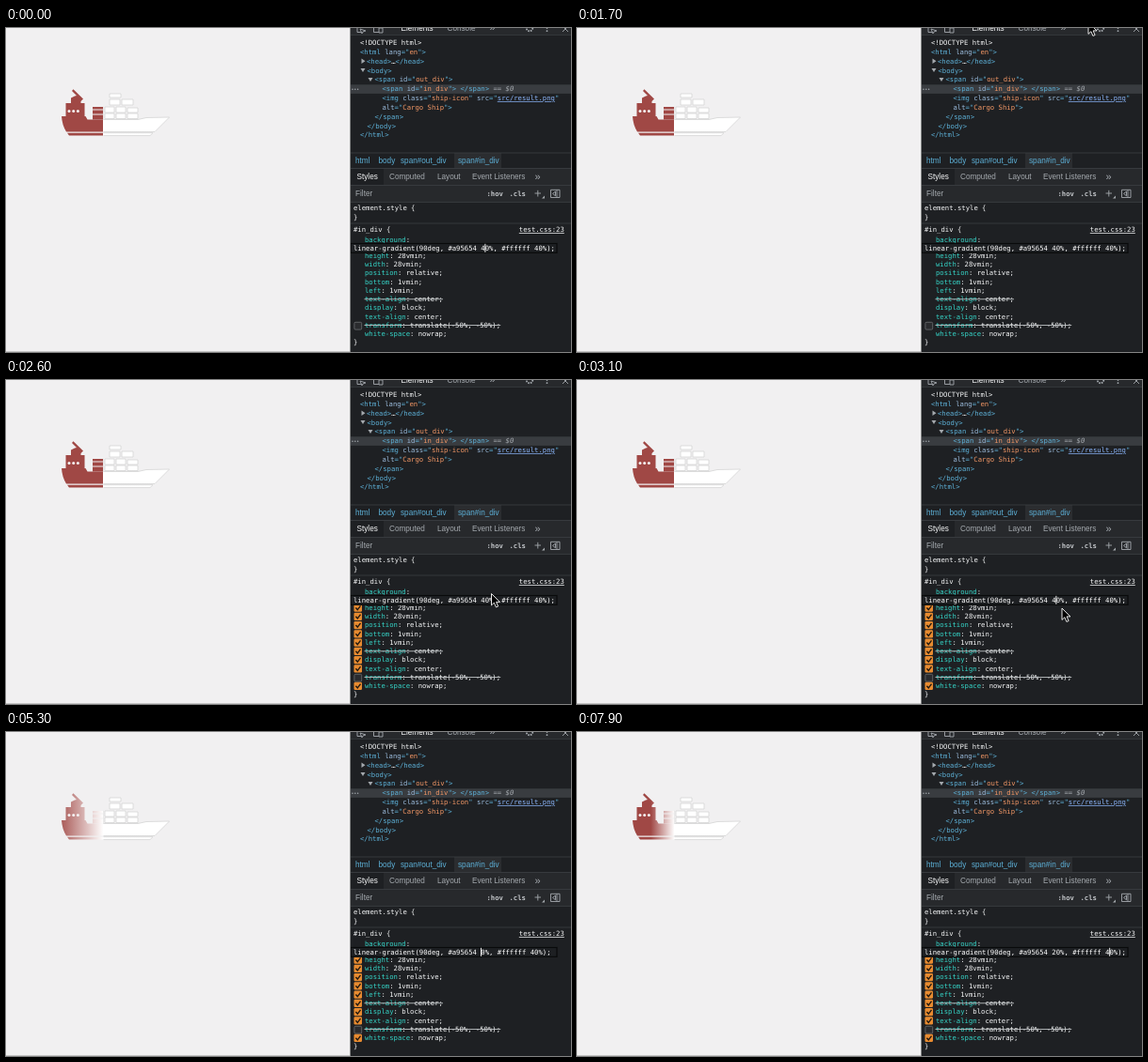
These frames come from a looping animation (600 px wide and 345 px high, 8 s). An HTML page:

```html
<!DOCTYPE html>
<html lang="en">
<head>
<meta charset="utf-8">
<title>Gradient editing</title>
<style>
  html, body { margin: 0; width: 100%; height: 100%; overflow: hidden; background: #f1f0f1; }
  svg { display: block; width: 600px; height: 345px; }
  text { white-space: pre; }
  .mono { font: 7.26px "DejaVu Sans Mono", "Liberation Mono", monospace; }
  .sans { font: 8.2px "Liberation Sans", Arial, sans-serif; }
</style>
</head>
<body>
<svg id="stage" viewBox="0 0 600 345">
  <defs>
    <linearGradient id="paint" gradientUnits="userSpaceOnUse" x1="53.5" x2="178.5" y1="0" y2="0">
      <stop id="stop" offset=".4" stop-color="#a04845"/>
      <stop offset=".4" stop-color="#fff"/>
    </linearGradient>
    <linearGradient id="edge" gradientUnits="userSpaceOnUse" x1="103" x2="104" y1="0" y2="0">
      <stop stop-color="#d4d4d4" stop-opacity="0"/>
      <stop offset="1" stop-color="#d4d4d4"/>
    </linearGradient>
    <pattern id="checks" width="14" height="14" patternUnits="userSpaceOnUse">
      <path fill="#fff" d="M0 0h14v14H0z"/>
      <path fill="#bfbfbf" d="M0 0h7v7H0zM7 7h7v7H7z"/>
    </pattern>
    <g id="ship">
      <path d="M59 94H84.5L86.5 97.5H140L149 95.5 173.5 95 158 110.5H64Q59.5 103 59 94Z"/>
      <path d="M65 111.7H156L153 114.6H67Z"/>
      <path d="M63.5 94V80H69V74.5L73 72.5 75 72 70 67 71.5 65.2 82 75.5 79.5 78V80H83.5V94Z"/>
      <path d="M92 84H103.5V86.5H92ZM92 87.5H103.5V91.5H92ZM92 92.5H103.5V97.5H92Z"/>
      <path d="M105 84H115V90H105ZM105 91H115V96.5H105ZM117 84H127V90H117ZM117 91H127V96.5H117ZM129 85H140V90H129ZM129 91H140V96.5H129Z"/>
      <path d="M110 70H122V74H110ZM110 76H121V82H110ZM123 76H135V82H123Z"/>
    </g>
  </defs>

  <g fill="url(#paint)" stroke="url(#edge)" stroke-width=".8"><use href="#ship"/></g>
  <g fill="#f4f1f1"><circle cx="67" cy="88.5" r="1.5"/><circle cx="71.7" cy="88.5" r="1.5"/><circle cx="76.4" cy="88.5" r="1.5"/></g>
  <path d="M0 344.5H365" stroke="#c4c4c4"/>
  <g id="panel"></g>

  <g id="preview">
    <path d="M374 84H546L553 78 560 84H595Q598 84 598 87V248Q598 251 595 251H374Q371 251 371 248V87Q371 84 374 84Z" fill="#1b1c1f" stroke="#101113"/>
    <path d="M452 96h66v66h-66z" fill="#f1eff0"/>
    <use href="#ship" transform="translate(430.5 82.6) scale(.47)" fill="url(#checks)"/>
    <g id="facts"></g>
  </g>
  <g id="hint">
    <path d="M369.5 245.5H600V269H369.5z" fill="#2a2a2b" stroke="#38383a" stroke-width=".5"/>
    <text class="sans" x="373" y="255" fill="#b9b9b9">Increment/decrement with mousewheel or up/down keys.</text>
    <text class="sans" x="373" y="264.3" fill="#b9b9b9">Cmd: ±100, Shift: ±10, Alt: ±0.1</text>
  </g>
  <path id="arrow" d="M0 0V12.4L2.9 9.7 4.9 14.4 7.1 13.5 5.1 8.9H9Z" fill="#000" stroke="#fff" stroke-width=".9"/>
  <g id="beam" fill="none">
    <path d="M-3 -5Q0 -5 0 -3V4Q0 6 -3 6M3 -5Q0 -5 0 -3V4Q0 6 3 6M-1.5 2H1.5" stroke="#fff" stroke-width="2"/>
    <path d="M-3 -5Q0 -5 0 -3V4Q0 6 -3 6M3 -5Q0 -5 0 -3V4Q0 6 3 6M-1.5 2H1.5" stroke="#000" stroke-width=".8"/>
  </g>
</svg>
<script>
const $ = id => document.getElementById(id);
const WHITE = '#f6f7f8', GREY = '#a4a9ae', TAG = '#5db0d7', ATTR = '#9bbbdc', VALUE = '#f29766', LINK = '#8ab4f8', PROP = '#35d4c7';
const PANEL = '#1e2023', BAR = '#27292c', RULE = '#3c3f43';
const CHAR = 4.37, EDIT_X = 369;

const esc = s => s.replace(/&/g, '&amp;').replace(/</g, '&lt;');
const span = (fill, s, extra = '') => `<tspan fill="${fill}" ${extra}>${esc(s)}</tspan>`;
const text = (cls, x, y, body, extra = '') => `<text class="${cls}" x="${x}" y="${y}" ${extra}>${body}</text>`;
const mono = (x, y, s, fill = WHITE, extra = '') => text('mono', x, y, esc(s), `fill="${fill}" ${extra}`);
const sans = (x, y, s, fill = WHITE, extra = '') => text('sans', x, y, esc(s), `fill="${fill}" ${extra}`);
const rect = (x, y, w, h, fill, extra = '') => `<rect x="${x}" y="${y}" width="${w}" height="${h}" fill="${fill}" ${extra}/>`;
const line = (d, stroke, width = 1) => `<path d="${d}" fill="none" stroke="${stroke}" stroke-width="${width}"/>`;
const dots = (points, r) => points.map(([x, y]) => `<circle cx="${x}" cy="${y}" r="${r}" fill="${GREY}"/>`).join('');
const attr = (name, value) => span(ATTR, ` ${name}`) + span(TAG, '="') + span(VALUE, value) + span(TAG, '"');

function treeMarkup() {
  const rows = [
    [376, span(WHITE, '<!DOCTYPE html>')],
    [376, span(TAG, '<html') + attr('lang', 'en') + span(TAG, '>')],
    [383, span(TAG, '<head>') + span(WHITE, '…') + span(TAG, '</head>')],
    [383.5, span(TAG, '<body>')],
    [391.5, span(TAG, '<span') + attr('id', 'out_div') + span(TAG, '>')],
    [399.5, span(TAG, '<span') + attr('id', 'in_div') + span(TAG, '> </span>') + span(GREY, ' == ') + span(GREY, '$0', 'font-style="italic"')],
    [399.5, span(TAG, '<img') + attr('class', 'ship-icon') + span(ATTR, ' src') + span(TAG, '="') +
      span(LINK, 'src/result.png', 'text-decoration="underline"') + span(TAG, '"')],
    [399.5, span(ATTR, 'alt') + span(TAG, '="') + span(VALUE, 'Cargo Ship') + span(TAG, '">')],
    [391.5, span(TAG, '</span>')],
    [383.5, span(TAG, '</body>')],
    [376, span(TAG, '</html>')]
  ];
  return rect(366, 60.3, 234, 9.6, '#393c40') +
    rows.map(([x, body], i) => text('mono', x, 18 + 9.84 * i, body)).join('') +
    `<path fill="${GREY}" d="M377.5 32.5V38L381.5 35.2ZM376.5 43H381.5L379 47ZM384.5 53H389.5L387 57Z"/>` +
    dots([[368, 65.3], [370.8, 65.3], [373.6, 65.3]], .75);
}

function barsMarkup() {
  const icons =
    'M373 0V4.5H377M376 1L382 3 379 4 378 6ZM390.5 0V4.5H396M396 0H400V5H396Z' +
    'M561.5 176H568M564.8 172.8V179.5M578.5 172.3H588V180.5H578.5ZM585 172.3V180.5M583.5 174L580.5 176.4 583.5 178.8Z' +
    'M591 -2L597 4M597 -2L591 4';
  const big = 'style="font-size:11px"', bold = 'style="font-weight:bold"';
  return rect(366, 0, 234, 7, BAR) + line('M366 7.5H600', RULE, .7) +
    sans(419.5, 3, 'Elements') + sans(468.5, 3, 'Console', GREY) + sans(513.5, 3, '»', GREY, big) +
    `<circle cx="556" cy="0" r="3.3" fill="none" stroke="${GREY}" stroke-width="1.8" stroke-dasharray="1.6 1"/>` +
    dots([[574.5, 0], [574.5, 3.2]], .9) +
    rect(366, 133, 234, 16, PANEL) + rect(476, 133, 50, 16, '#2b2d30') +
    ['html', 'body', 'span#out_div', 'span#in_div'].map((s, i) => sans([371, 395.5, 419, 480][i], 144, s, TAG)).join('') +
    rect(366, 149, 234, 36, BAR) + rect(366, 150, 35, 17, PANEL) +
    line('M366 133H600M366 149.5H600M366 167.5H600M366 185.5H600', RULE, .8) +
    sans(372.5, 161, 'Styles') +
    ['Computed', 'Layout', 'Event Listeners'].map((s, i) => sans([407, 458, 495][i], 161, s, GREY)).join('') +
    sans(561.5, 161.5, '»', GREY, big) + sans(371, 179, 'Filter', GREY) +
    mono(510.5, 178.6, ':hov', '#c3c6ca', bold) + mono(534.5, 178.6, '.cls', '#c3c6ca', bold) +
    line(icons, GREY, .9) + `<path d="M569 181.5H572V178.5Z" fill="${GREY}"/>`;
}

function rulesMarkup() {
  const rules = ['height: 28vmin', 'width: 28vmin', 'position: relative', 'bottom: 1vmin', 'left: 1vmin',
    'text-align: center', 'display: block', 'text-align: center', 'transform: translate(-50%, -50%)', 'white-space: nowrap'];
  const rowY = i => 244.9 + 9.25 * i;
  let ticks = '';
  const body = rules.map((rule, i) => {
    const [name, value] = rule.split(': '), y = rowY(i), off = i === 8;
    if (!off) ticks += rect(369.5, y - 6.4, 8.5, 8.3, '#e88b30', 'rx="1.2"') + line(`M371.4 ${y - 2.3}l1.9 2 3.2 -4.2`, '#241a10', 1.4);
    const strike = off || i === 5 ? line(`M380.5 ${y - 2.4}H${381 + (rule.length + 1) * CHAR}`, '#d0d3d6', .8) : '';
    return text('mono', 381, y, span(PROP, name) + span(WHITE, `: ${value};`)) + strike;
  }).join('');
  return mono(369, 193.5, 'element.style {') + mono(369, 203.6, '}') + line('M366 208H600', RULE, .8) +
    mono(369, 217.2, '#in_div {') + mono(544.8, 217.2, 'test.css:23', WHITE, 'text-decoration="underline"') +
    text('mono', 381, 228, span(PROP, 'background') + span(WHITE, ':')) + body +
    rect(369.9, 313.3, 7.8, 7.8, '#2a2b2e', 'rx="1.2" stroke="#777a7d" stroke-width=".7"') +
    `<g id="ticks">${ticks}</g>` + mono(369, rowY(10), '}') +
    rect(366, 229.5, 219, 9.8, PANEL, 'stroke="#090a0b" stroke-width="1.2"') +
    mono(EDIT_X, 236.7, '', '#fff', 'id="edit"') + rect(0, 229.8, .9, 9, '#fff', 'id="caret"');
}

$('panel').innerHTML = rect(366, 0, 234, 345, PANEL) + treeMarkup() + barsMarkup() + rulesMarkup() +
  line('M365.5 0V345', '#8b8c8d');

$('facts').innerHTML = [
  ['Rendered size:', '211 × 211 px'], ['Rendered aspect ratio:', '1∶ 1'], ['Intrinsic size:', '700 × 700 px'],
  ['Intrinsic aspect ratio:', '1∶ 1'], ['File size:', '18.0 kB'], ['Current source:', 'file:///Users/pinevale/Desktop/21_k']
].map(([label, value], i) => {
  const y = 176.3 + 11.2 * i;
  return sans(457.8, y, label, GREY, 'text-anchor="end"') + sans(462, y, value, i === 5 ? LINK : '#fff');
}).join('') + sans(462, 241.8, 'd305/frontend/src/result.png', LINK);

// time, x, y of the pointer
const path = [[1600, 546, -24], [1700, 543, -6], [1900, 552, 72], [2100, 517, 183.5], [2500, 516, 215],
  [2700, 515, 240], [3100, 515, 243], [3400, 511, 237]];

function pointerAt(t) {
  const i = path.findIndex(p => p[0] > t);
  if (i === 0) return path[0].slice(1);
  if (i < 0) return path[path.length - 1].slice(1);
  const [t0, x0, y0] = path[i - 1], [t1, x1, y1] = path[i], k = (t - t0) / (t1 - t0);
  return [x0 + (x1 - x0) * k, y0 + (y1 - y0) * k];
}

function caretIndex(t) {
  if (t < 5300) return 32;
  if (t < 5600) return 31;
  if (t < 6200) return 32 + Math.max(0, Math.floor((t - 5700) / 100));
  return Math.min(45, 37 + Math.floor((t - 6200) / 200));
}

const show = (id, on) => $(id).setAttribute('visibility', on ? 'visible' : 'hidden');

function draw(t) {
  const percent = t < 5300 ? 40 : t < 5600 ? 0 : 20;
  $('stop').setAttribute('offset', percent / 100);
  $('edit').textContent = `linear-gradient(90deg, #a95654 ${percent}%, #ffffff 40%);`;
  $('caret').setAttribute('x', EDIT_X - .4 + caretIndex(t) * CHAR);
  show('caret', t >= 5300 || t % 1000 < 300 || t % 1000 >= 800);
  show('ticks', t >= 2600);
  show('preview', t >= 2000 && t < 2600);
  show('hint', t >= 4100 && t < 5300);
  show('arrow', t >= 1700 && t < 3400);
  show('beam', t >= 3400 && t < 5300);
  const at = `translate(${pointerAt(t)})`;
  $('arrow').setAttribute('transform', at);
  $('beam').setAttribute('transform', at);
}

function tick() {
  draw(Math.floor(performance.now() % 8000 / 100) * 100);
  requestAnimationFrame(tick);
}
tick();
</script>
</body>
</html>
```
